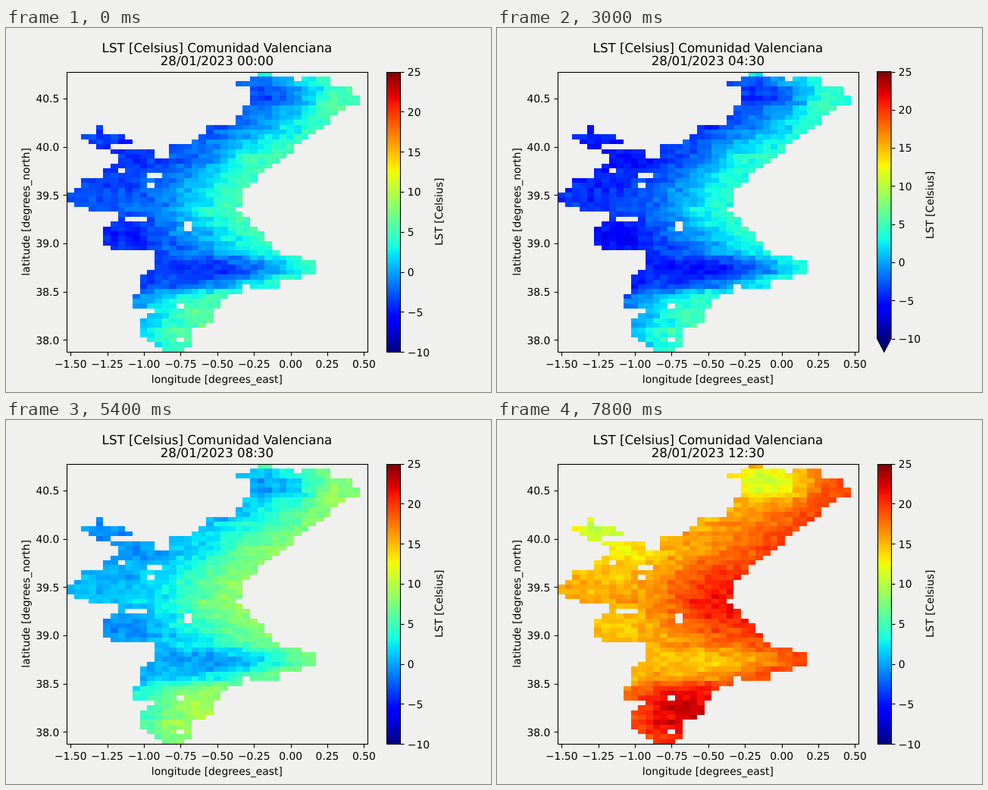
An HTML page with a canvas for the animation above (8000 ms loop, 640 by 480 pixels).

```html
<!DOCTYPE html>
<html lang="en">
<head>
<meta charset="utf-8">
<title>Land surface temperature</title>
<style>
html, body { margin: 0; width: 100%; height: 100%; overflow: hidden; background: #f0f0ee; }
canvas { display: block; width: 640px; height: 480px; }
</style>
</head>
<body>
<canvas id="stage" width="640" height="480"></canvas>
<script>
const ctx = document.getElementById('stage').getContext('2d');
const LOOP = 8000, STEP = 300;
const L = 80, T = 57.6, W = 396.8, H = 369.6, COLS = 41, ROWS = 58;
const BAR = { x: 501.6, w: 18.5 };
const FONT = '"DejaVu Sans", sans-serif';
const SMALL = 13.89, LARGE = 16.67;

// Region in cell units: mainland, detached enclave, then holes.
const region = new Path2D(`
  M26 0H28V1H36V3H39V5H40V7H38V7.5L24 24.5V28H23V29L23.5 29 25.6 32 29 37.5 32 38.5 34 39
  V42L29 43V45H24V46H22L20 50V52L17 53V56L15 58H13V57L10 54V52L12 50V49H9V46H10V42L12 41
  V37H7L5 35V33L7 31V29H4L0 27V25L2 24V22H5V20L7 19V17H6V16H12V18H14V15H17L19 12V11H23
  V10L25 6V3H23V2H25V1H26Z
  M4 11H5V13H8L9 15H6V16H5L2 13H4Z
  M31 1h1v1h-1z M7 20h1v1h-1z M11 21h2v1h-2z M11 23h1v1h-1z M8 30h3v1h-3z
  M16 31h1v2h-1z M24 44h1v1h-1z M15 48h1v1h-1z M15 55h1v1h-1z`);

// Warm and cool areas: centre, radii, offset at night and at noon.
const areas = [
  { c: 29, r: 2, w: 6, h: 5, night: -1.5, noon: -6 },
  { c: 5, r: 13, w: 4, h: 3, night: -.5, noon: -5.5 },
  { c: 35, r: 6, w: 3, h: 3, night: 2.5, noon: 1 },
  { c: 24, r: 17, w: 4, h: 3, night: 2, noon: 0 },
  { c: 9, r: 18, w: 5, h: 4, night: -1, noon: -2 },
  { c: 8, r: 34, w: 4, h: 3, night: -2, noon: -1 },
  { c: 20, r: 28, w: 5, h: 6, night: 1, noon: 2.5 },
  { c: 22, r: 41, w: 9, h: 3, night: -2, noon: -1.5 },
  { c: 15, r: 50, w: 6, h: 5, night: 2.5, noon: 4.5 }];

const clamp = (v, a, b) => Math.min(b, Math.max(a, v));
const mix = (a, b, t) => a + (b - a) * t;
const snap = v => Math.round(v) + .5;

// Repeatable noise in -1..1.
function noise(a, b, c) {
  const s = Math.sin(a * 127.1 + b * 311.7 + c * 74.7) * 43758.5453;
  return (s - Math.floor(s)) * 2 - 1;
}

function jet(v) {
  const r = Math.min((v - .35) / .31, 1 - (v - .89) / .22);
  const g = Math.min((v - .125) / .25, (.91 - v) / .27);
  const b = Math.min(.5 + v / .22, (.65 - v) / .31);
  return `rgb(${[r, g, b].map(c => Math.round(255 * clamp(c, 0, 1))).join(',')})`;
}

const heat = t => jet(clamp((t + 10) / 35, 0, 1));

// The land cools at night and warms at noon from the coast inland.
function makeCell(c, r, inland) {
  const far = 1 - Math.exp(-((inland / 9) ** 1.5));
  const rough = .8 * noise(c, r, 1) + .6 * noise(c >> 1, r, 2);
  let night = 4.5 - 8 * far + rough, noon = 19.5 - 4.5 * far + rough;
  for (const a of areas) {
    const near = Math.exp(-(((c - a.c) / a.w) ** 2) - ((r - a.r) / a.h) ** 2);
    night += a.night * near;
    noon += a.noon * near;
  }
  return { c, r, night, noon };
}

const cells = [];
for (let r = 0; r < ROWS; r++) {
  let coast = -1;
  for (let c = COLS - 1; c >= 0; c--) {
    if (!ctx.isPointInPath(region, c + .5, r + .5, 'evenodd')) continue;
    if (coast < 0) coast = r > 10 && c < 10 ? 32 : c;
    cells.push(makeCell(c, r, coast - c));
  }
}

function temperature(cell, hour) {
  const sun = Math.sin(clamp((hour - 7.5) / 5, 0, 1) * Math.PI / 2) ** 1.3;
  const cooling = Math.sin(clamp(hour / 9, 0, 1) * Math.PI);
  return mix(cell.night, cell.noon, sun) - cooling + .5 * noise(cell.c, cell.r, hour + 3);
}

function text(str, x, y, size = SMALL, align = 'center') {
  ctx.font = `${size}px ${FONT}`;
  ctx.textAlign = align;
  ctx.fillStyle = '#000';
  ctx.fillText(str, x, y);
}

function sideText(str, x, y) {
  ctx.save();
  ctx.translate(x, y);
  ctx.rotate(-Math.PI / 2);
  text(str, 0, 0);
  ctx.restore();
}

function line(x1, y1, x2, y2) {
  ctx.beginPath();
  ctx.moveTo(x1, y1);
  ctx.lineTo(x2, y2);
  ctx.stroke();
}

const label = (v, digits) => (v < 0 ? '\u2212' : '') + Math.abs(v).toFixed(digits);

function drawMap(hour) {
  const px = c => Math.round(L + c * W / COLS), py = r => Math.round(T + r * H / ROWS);
  for (const cell of cells) {
    const x = px(cell.c), y = py(cell.r);
    ctx.fillStyle = heat(temperature(cell, hour));
    ctx.fillRect(x, y, px(cell.c + 1) - x, py(cell.r + 1) - y);
  }
}

function drawAxes() {
  const bottom = T + H;
  ctx.strokeRect(snap(L), snap(T), snap(L + W) - snap(L), snap(bottom) - snap(T));
  for (let i = 0; i < 9; i++) {
    const x = 85.2 + i * 48.4;
    line(snap(x), 428, snap(x), 432.5);
    text(label(-1.5 + i / 4, 2), x, 448);
  }
  for (let i = 0; i < 6; i++) {
    const y = 411.3 - i * 63.7;
    line(75.5, snap(y), 80, snap(y));
    text(label(38 + i / 2, 1), 70.3, Math.round(y + 5.3), SMALL, 'right');
  }
  text('longitude [degrees_east]', 278.4, 468);
  sideText('latitude [degrees_north]', 31, 242.4);
}

function drawBar(extended) {
  const h = extended ? 352 : H, end = T + h, tip = T + H, { x, w } = BAR;
  const fill = ctx.createLinearGradient(0, end, 0, T);
  for (let i = 0; i <= 70; i++) fill.addColorStop(i / 70, jet(i / 70));
  ctx.fillStyle = fill;
  ctx.beginPath();
  if (extended) {
    ctx.moveTo(x, T);
    ctx.lineTo(x + w, T);
    ctx.lineTo(x + w, end);
    ctx.lineTo(x + w / 2, tip);
    ctx.lineTo(x, end);
    ctx.closePath();
  } else {
    ctx.rect(snap(x), snap(T), snap(x + w) - snap(x), snap(end) - snap(T));
  }
  ctx.fill();
  ctx.stroke();
  for (let v = -10; v <= 25; v += 5) {
    const y = end - (v + 10) * h / 35;
    line(521, snap(y), 525.5, snap(y));
    text(label(v, 0), 529.8, Math.round(y + 5.3), SMALL, 'left');
  }
  sideText('LST [Celsius]', 576, T + h / 2);
}

function draw(k) {
  const hour = k / 2;
  ctx.fillStyle = '#f0f0ee';
  ctx.fillRect(0, 0, 640, 480);
  ctx.strokeStyle = '#000';
  ctx.lineWidth = 1.1;
  ctx.textRendering = 'geometricPrecision';
  drawMap(hour);
  drawAxes();
  drawBar(hour >= 4 && hour < 7.5);
  const clock = `${String(k >> 1).padStart(2, '0')}:${k % 2 ? '30' : '00'}`;
  text('LST [Celsius] Comunidad Valenciana', 278.4, 32, LARGE);
  text(`28/01/2023 ${clock}`, 278.4, 49, LARGE);
}

let shown = -1;
function tick(now) {
  const k = Math.max(0, Math.floor((now % LOOP) / STEP) - 1);
  if (k !== shown) draw(shown = k);
  requestAnimationFrame(tick);
}
tick(performance.now());
</script>
</body>
</html>
```
